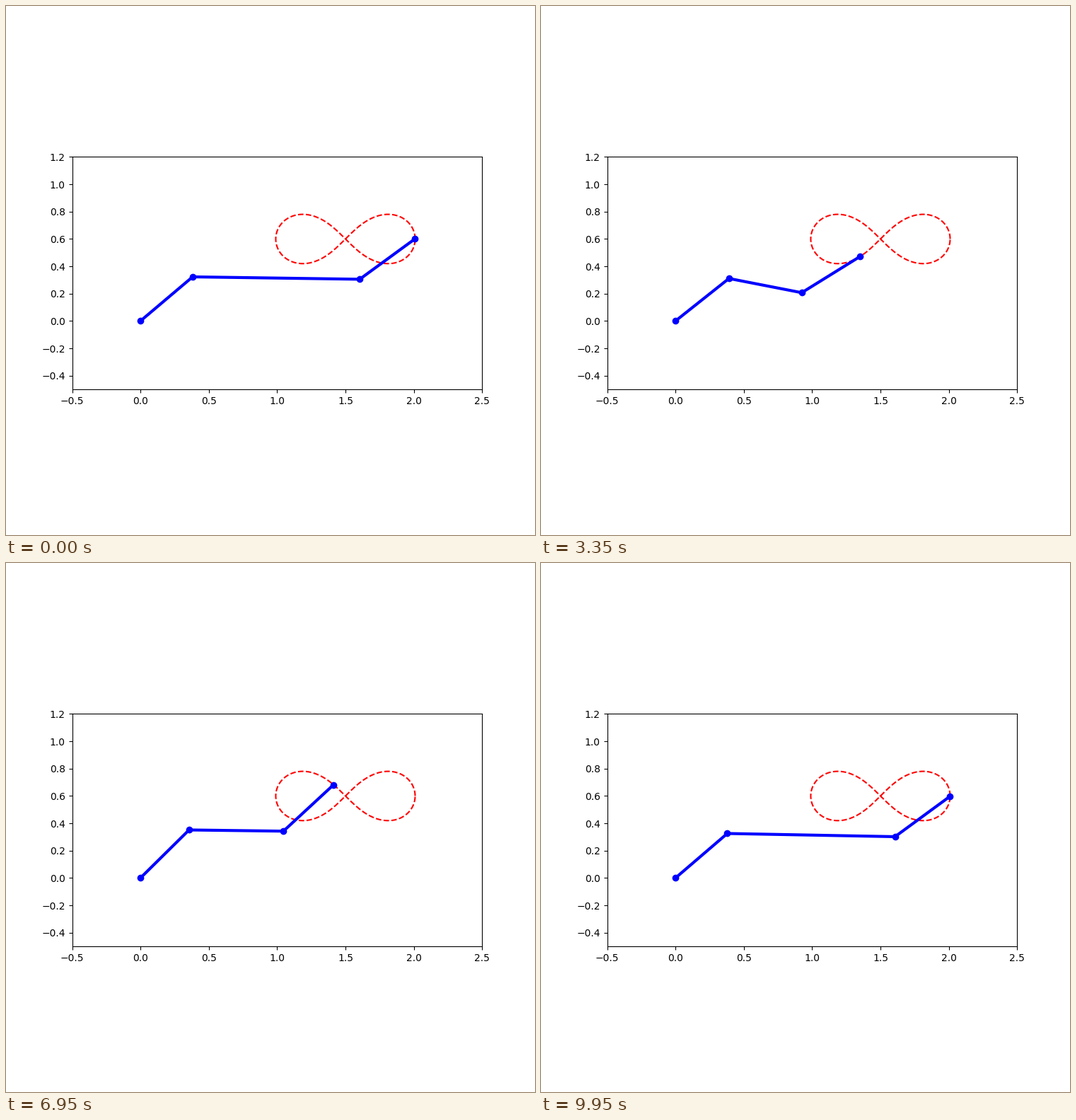
A matplotlib script for the animation above (10 s loop, 748x748 px).

```python
import numpy as np
import matplotlib.pyplot as plt
from matplotlib.animation import FuncAnimation

FRAMES = 200
INTERVAL = 50
LINK = 0.5          # length of the first and last link
GAIN = 0.1
TOLERANCE = 0.002


def lemniscate(t, centre=(1.5, 0.6), a=0.51):
    k = a * np.cos(t) / (1 + np.sin(t) ** 2)
    return centre[0] + k, centre[1] + k * np.sin(t)


def joints(q):
    """Points of the arm: revolute, revolute, prismatic, revolute."""
    a1, a2, d, a3 = q
    angles = np.cumsum([a1, a2, a3])
    lengths = np.array([LINK, d, LINK])
    x = np.concatenate([[0], np.cumsum(lengths * np.cos(angles))])
    y = np.concatenate([[0], np.cumsum(lengths * np.sin(angles))])
    return np.array([x, y])


def jacobian(q):
    pts = joints(q)
    arm = pts[:, 3:] - pts[:, :3]
    spin = np.array([-arm[1], arm[0]])
    slide = np.array([np.cos(q[0] + q[1]), np.sin(q[0] + q[1])])
    return np.column_stack([spin[:, 0], spin[:, 1], slide, spin[:, 2]])


def reach(q, target):
    """Move the tip to the target in small least-norm steps."""
    for _ in range(300):
        error = target - joints(q)[:, 3]
        if np.hypot(*error) < TOLERANCE:
            break
        q = q + GAIN * np.linalg.pinv(jacobian(q)) @ error
    return q


path_x, path_y = lemniscate(np.linspace(0, 2 * np.pi, FRAMES))

poses = []
q = np.array([np.pi / 4, -np.pi / 4, 0.5, np.pi / 4])
for target in zip(path_x, path_y):
    q = reach(q, np.array(target))
    poses.append(joints(q))

fig, ax = plt.subplots(figsize=(7.48, 7.48), dpi=100)
ax.set_aspect("equal")
ax.set_xlim(-0.5, 2.5)
ax.set_ylim(-0.5, 1.2)
ax.plot(path_x, path_y, "r--", lw=1.5)
arm_line, = ax.plot(*poses[0], "bo-", lw=3, ms=6)


def update(i):
    arm_line.set_data(*poses[i])
    return arm_line,


anim = FuncAnimation(fig, update, frames=FRAMES, interval=INTERVAL,
                     repeat=True, repeat_delay=0)
plt.show()
```
